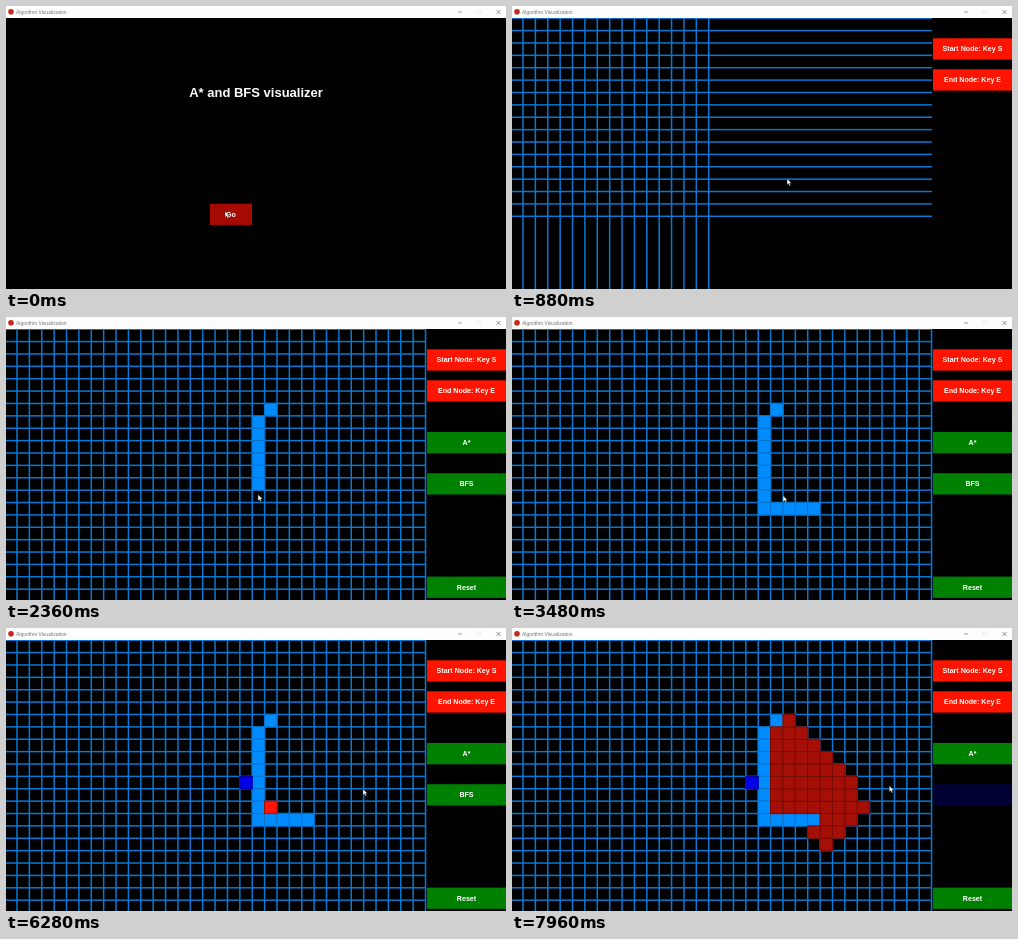
Recreate the animation shown at these times as an HTML page with a canvas. Size 500 by 283 pixels, loop 8000 ms.

```html
<!DOCTYPE html>
<html lang="en">
<head>
<meta charset="utf-8">
<title>Algorithm Visualization</title>
<style>
  html, body { margin: 0; width: 100%; height: 100%; overflow: hidden; background: #000; }
  canvas { display: block; width: 100vw; height: 100vh; }
</style>
</head>
<body>
<canvas id="stage"></canvas>
<script>
const W = 500, H = 283, LOOP = 8000, STEP = 40;
const LEFT = 11, TOP = 12.2, PITCH = 12.38, COLS = 34, ROWS = 22, GRID_RIGHT = 420;
const GRID_START = 480, LINE_MS = 25, GRID_DONE = GRID_START + COLS * LINE_MS;
const START = [20, 13], END = [18, 11];
const START_AT = 4000, END_AT = 5480, HOVER_AT = 6560;

const canvas = document.getElementById('stage');
const ctx = canvas.getContext('2d');

// Walls in drawing order: one corner cell, a column down, a row to the right.
const walls = [[20, 6]];
for (let row = 7; row <= 14; row++) walls.push([19, row]);
for (let col = 20; col <= 23; col++) walls.push([col, 14]);
const wallTime = i => i ? 1800 + (i - 1) * 95 : 1600;

// Pointer positions: time, x, y
const pointerPath = [
  [0, 219, 205], [440, 220, 205], [880, 275, 172.5], [1480, 264, 91.5],
  [1640, 264, 93], [1800, 252, 105], [2465, 252, 191], [2845, 302, 191],
  [3100, 300, 189], [3480, 271, 178.5], [3800, 264, 179], [4900, 264, 179],
  [5360, 234.5, 157.5], [5900, 237, 156], [6600, 458, 165],
  [7160, 460, 163], [7280, 459, 163], [7560, 400, 159], [8000, 375, 157.5]
];

function searchOrder() {
  const key = ([c, r]) => c + ',' + r;
  const seen = new Set([...walls, START].map(key));
  const queue = [START];
  for (let i = 0; i < queue.length && i < 60; i++) {
    const [c, r] = queue[i];
    for (const next of [[c, r - 1], [c + 1, r], [c, r + 1], [c - 1, r]]) {
      if (!seen.has(key(next))) {
        seen.add(key(next));
        queue.push(next);
      }
    }
  }
  return queue;
}
const explored = searchOrder();

function rect(x, y, w, h, color) {
  ctx.fillStyle = color;
  ctx.fillRect(x, y, w, h);
}

function text(str, x, y, size, color = '#fff', align = 'center', font = 'bold') {
  ctx.font = `${font} ${size}px "Liberation Sans", Arial, sans-serif`;
  ctx.textAlign = align;
  ctx.fillStyle = color;
  ctx.fillText(str, x, y);
}

function button(label, x, y, w, color) {
  rect(x, y, w, 21.3, color);
  text(label, x + w / 2, y + 13.1, 7.1);
}

function cell([col, row], fill, edge) {
  const x = LEFT + col * PITCH, y = TOP + row * PITCH;
  rect(x - 0.6, y - 0.6, PITCH + 1.2, PITCH + 1.2, edge);
  rect(x + 0.4, y + 0.4, PITCH - 0.8, PITCH - 0.8, fill);
}

function titleBar() {
  rect(0, 0, W, 12, '#fdfdfd');
  ctx.fillStyle = '#c8281c';
  ctx.beginPath();
  ctx.arc(5, 5.8, 2.8, 0, 7);
  ctx.fill();
  text('Algorithm Visualization', 10, 7.6, 5, '#777', 'left', 'normal');
  rect(452, 5.6, 4, 0.7, '#777');
  ctx.lineWidth = 0.5;
  ctx.strokeStyle = '#ddd';
  ctx.strokeRect(471, 4, 3.6, 3.6);
  ctx.lineWidth = 0.7;
  ctx.strokeStyle = '#666';
  ctx.beginPath();
  ctx.moveTo(490.5, 4); ctx.lineTo(494.5, 8);
  ctx.moveTo(494.5, 4); ctx.lineTo(490.5, 8);
  ctx.stroke();
}

function grid(t) {
  const count = Math.floor((t - GRID_START) / LINE_MS);
  const color = '#0878d4';
  for (let i = 0; i < Math.min(count, COLS); i++) {
    rect(LEFT + i * PITCH - 0.75, 12, 1.5, H - 12, color);
  }
  for (let i = 0; i < Math.min(count + 1, ROWS); i++) {
    rect(0, TOP + i * PITCH - 0.75, GRID_RIGHT, 1.5, color);
  }
}

function board(t) {
  grid(t);
  walls.forEach((w, i) => { if (t >= wallTime(i)) cell(w, '#008cff', '#0670c8'); });
  if (t >= START_AT) cell(START, '#ff1407', '#9c1208');
  if (t >= END_AT) cell(END, '#0000e8', '#0000a0');
  const count = Math.max(0, Math.floor(2.01 + (t - 7160) / 17.3));
  explored.slice(0, count).forEach(c => cell(c, '#a50f06', '#780b05'));

  button('Start Node: Key S', 421, 32.3, 79, '#ff1400');
  button('End Node: Key E', 421, 63.3, 79, '#ff1400');
  if (t < GRID_DONE) return;
  button('A*', 421, 115, 79, '#008000');
  if (t < HOVER_AT) button('BFS', 421, 156.2, 79, '#008000');
  else rect(421, 156.2, 79, 21.3, '#000032');
  button('Reset', 421, 259.6, 79, '#008000');
}

function pointer(t) {
  const i = pointerPath.findIndex(p => p[0] > t);
  const [t0, x0, y0] = pointerPath[i - 1], [t1, x1, y1] = pointerPath[i];
  const k = (t - t0) / (t1 - t0);
  ctx.save();
  ctx.translate(x0 + (x1 - x0) * k, y0 + (y1 - y0) * k);
  ctx.fillStyle = '#fff';
  ctx.strokeStyle = '#000';
  ctx.lineWidth = 0.4;
  ctx.fill(arrow);
  ctx.stroke(arrow);
  ctx.restore();
}
const arrow = new Path2D('M0 0V6.4L1.5 5.1L2.5 7.4L3.6 6.9L2.6 4.7H4.6Z');

function draw(t) {
  rect(0, 0, W, H, '#000');
  if (t < GRID_START) {
    text('A* and BFS visualizer', 250, 90.6, 13);
    button('Go', 204, 197.7, 42, '#a50a00');
  } else {
    board(t);
  }
  titleBar();
  pointer(t);
}

function frame(now) {
  const ratio = window.devicePixelRatio || 1;
  const w = Math.round(innerWidth * ratio), h = Math.round(innerHeight * ratio);
  if (canvas.width !== w || canvas.height !== h) {
    canvas.width = w;
    canvas.height = h;
  }
  ctx.setTransform(w / W, 0, 0, h / H, 0, 0);
  draw(Math.floor(now % LOOP / STEP) * STEP);
  requestAnimationFrame(frame);
}
frame(0);
</script>
</body>
</html>
```
